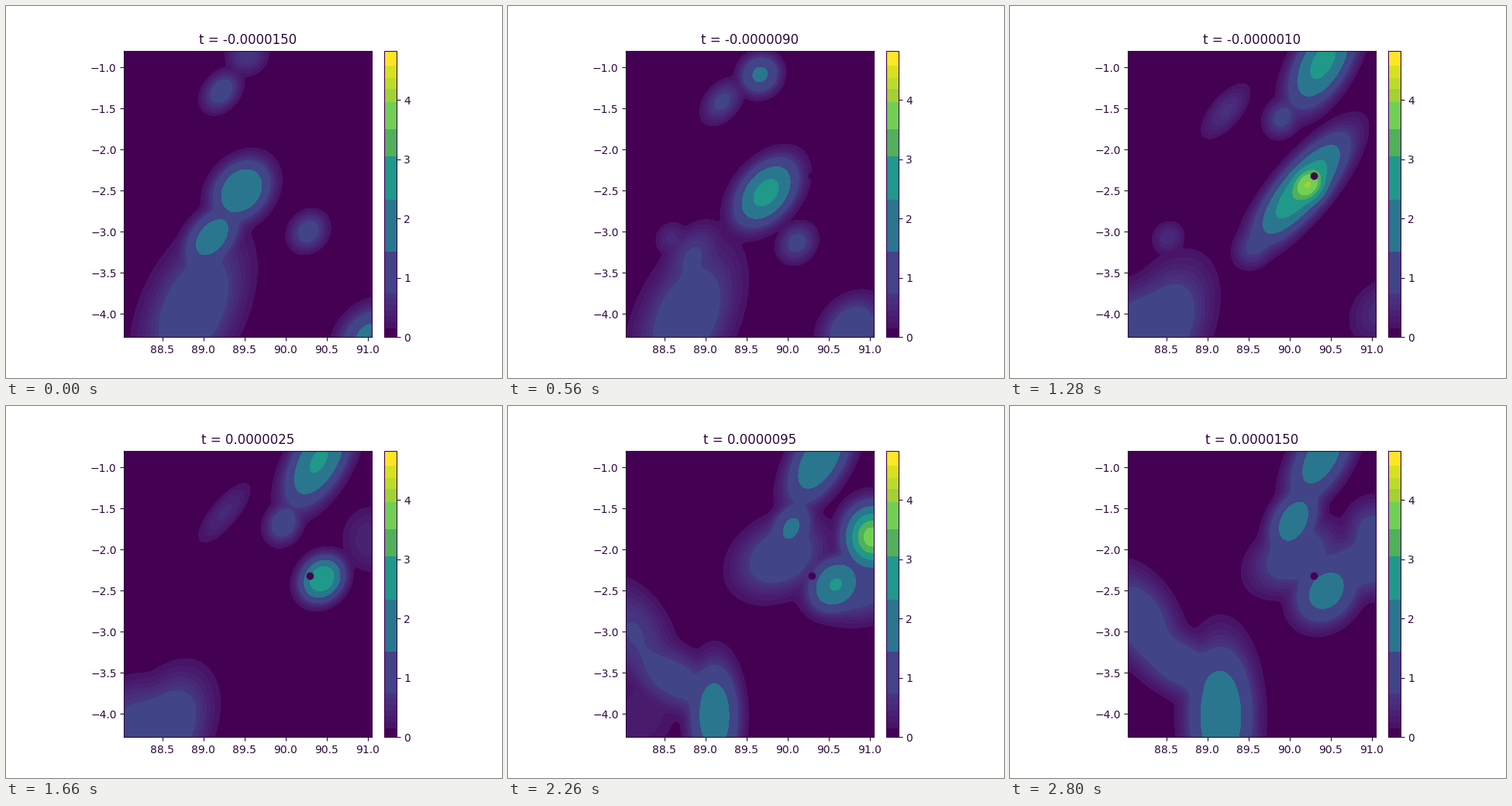
Write a matplotlib script that moves like this. It is 640 by 480 pixels and loops after 2820 ms.

```python
import numpy as np
import matplotlib.pyplot as plt
from matplotlib.animation import FuncAnimation
from matplotlib.cm import ScalarMappable
from matplotlib.colors import BoundaryNorm, ListedColormap

W, H, DPI = 640, 480, 100
INK, DARK = "#2e0a3c", "#440154"
LAST, TICK, RAMP = 60, 20, 6

# plot area in stage pixels (top-left origin); the bar is 5% wide with a 5% gap
LEFT, TOP, WIDTH, HEIGHT = 152.36, 57.6, 319.35, 369.6
BAR_W = 0.05 * WIDTH
BAR_X = LEFT + WIDTH + BAR_W
SCALE = 106
X0, Y1 = 88.0334, -0.798
X1, Y0 = X0 + WIDTH / SCALE, Y1 - HEIGHT / SCALE

LEVELS = [0, .15, .25, .35, .45, .55, .65, .74, 1.44, 2.32, 3.05, 3.5,
          3.96, 4.18, 4.37, 4.57, 4.83]
viridis = plt.get_cmap("viridis")
low = [DARK] + [viridis(v / 4.83) for v in LEVELS[2:8]]
high = ["#414487", "#2a768e", "#20988a", "#50b15a", "#72cf55",
        "#a2d136", "#bbdc2a", "#d6e21f", "#fde725"]
COLORS = low + high

px, py = np.meshgrid(np.linspace(LEFT, LEFT + WIDTH, 161),
                     np.linspace(TOP, TOP + HEIGHT, 186))
gx = X0 + (px - LEFT) / SCALE
gy = Y1 - (py - TOP) / SCALE


def smooth(u):
    u = np.clip(u, 0, 1)
    return u * u * (3 - 2 * u)


def mix(a, b, u):
    return a + (b - a) * u


class Filament:
    """Tilted blob drifting along evenly timed waypoints while it lives."""

    def __init__(self, span, path, size, height, grow=1, tilt=50):
        self.start, self.end = span
        self.path = np.array(path, float)
        self.size = np.array(size, float)
        self.grow = np.broadcast_to(grow, 2)
        self.height = height
        self.tilt = np.radians(tilt)

    def at(self, step):
        away = max(self.start - step, step - self.end, 0)
        u = np.clip((step - self.start) / (self.end - self.start), 0, 1)
        times = np.linspace(0, 1, len(self.path))
        cx, cy = (np.interp(u, times, axis) for axis in self.path.T)
        length, width = self.size * mix(1, self.grow, u * u)
        c, s = np.cos(self.tilt), np.sin(self.tilt)
        dx, dy = px - cx, cy - py
        r = np.hypot((dx * c + dy * s) / length, (dy * c - dx * s) / width)
        peak = mix(*self.height, u) * smooth(1 - away / RAMP)
        return peak * np.exp(-r ** 2.5)


FILAMENTS = [
    # central filament, stretched by the shear, and the front that leaves it
    Filament((0, 29), [(304, 238), (328, 238), (349, 250), (379, 235)],
             (40, 31), (2.3, 3.0), grow=(2.1, .87)),
    Filament((19, 60), [(350, 248), (404, 222), (426, 228), (408, 239)],
             (26, 22), (3.8, 1.8), grow=(1.7, 1.6)),
    # neck and lower left body
    Filament((0, 10), [(266, 298), (238, 320)], (42, 26), (1.9, 1.0)),
    Filament((14, 30), [(211, 300), (203, 299)], (20, 18), (.65, .5)),
    Filament((0, 43), [(242, 390), (228, 405), (198, 412), (225, 415)],
             (95, 52), (1.15, 1.1), grow=(.6, .8), tilt=65),
    Filament((26, 46), [(165, 412), (170, 400)], (52, 46), (1.0, .65)),
    # left wall, bridge and bottom outlet of the last phase
    Filament((44, 60), [(160, 300), (168, 275)], (66, 40), (.6, 1.1), tilt=-60),
    Filament((50, 60), [(215, 352), (218, 332)], (66, 36), (1.0, 1.05), tilt=-32),
    Filament((48, 60), [(266, 400), (272, 400)], (66, 30), (1.95, 2.0),
             grow=1.35, tilt=90),
    # upper left wisp and the blob descending beside it
    Filament((0, 43), [(278, 110), (275, 134), (286, 140)], (27, 19),
             (1.0, .35), grow=(2, .75)),
    Filament((0, 17), [(311, 62), (312, 74), (344, 109)], (25, 23), (.7, 1.95)),
    # stream from the top, its tongue and the patch below
    Filament((26, 60), [(404, 72), (402, 66)], (62, 30), (2.6, 1.9), tilt=60),
    Filament((26, 60), [(349, 142), (366, 160), (366, 148)], (24, 20),
             (.8, 1.9), grow=(1.75, 1.3), tilt=60),
    Filament((40, 60), [(350, 235), (352, 190), (368, 194)], (60, 44),
             (1.15, 1.1), grow=(.95, .85), tilt=30),
    # leg on the right and the lower right corner
    Filament((0, 28), [(390, 291), (370, 308), (314, 312)], (25, 21), (.95, .75)),
    Filament((0, 28), [(470, 430), (434, 420), (470, 412), (478, 395)],
             (42, 33), (1.75, .5)),
    # burst at the right edge and the shelf under it
    Filament((40, 60), [(470, 172), (469, 165)], (40, 34), (5.9, .95), tilt=90),
    Filament((43, 60), [(455, 240), (440, 236), (455, 205)], (58, 38),
             (1.0, 1.0), tilt=0),
]


def field(step):
    total = sum(f.at(step) ** 3 for f in FILAMENTS)
    return np.clip(np.cbrt(total), 0, 4.82)


def stage_axes(x, w):
    return fig.add_axes([x / W, 1 - (TOP + HEIGHT) / H, w / W, HEIGHT / H])


plt.rcParams.update({
    "font.family": "DejaVu Sans", "font.size": 10, "text.color": INK,
    "axes.edgecolor": INK, "xtick.color": INK, "ytick.color": INK,
    "axes.titlecolor": INK,
})
fig = plt.figure(figsize=(W / DPI, H / DPI), dpi=DPI, facecolor="white")
ax = stage_axes(LEFT, WIDTH)
ax.set_facecolor(DARK)
ax.set_xlim(X0, X1)
ax.set_ylim(Y0, Y1)
ax.set_xticks(np.arange(88.5, 91.1, 0.5))
ax.set_yticks(np.arange(-4, -0.9, 0.5))
ax.plot(90.294, -2.321, "o", color=DARK, markersize=6, zorder=3)
title = ax.set_title("", fontsize=12)

cmap = ListedColormap(COLORS)
norm = BoundaryNorm(LEVELS, cmap.N)
bar = fig.colorbar(ScalarMappable(norm, cmap), cax=stage_axes(BAR_X, BAR_W),
                   spacing="proportional", ticks=range(5))
bar.minorticks_off()
bar.outline.set_edgecolor(DARK)

shown = {"step": None, "fill": None}


def update(tick):
    # short, long, short: every third step is held for five ticks
    cycle, part = divmod(tick, 7)
    step = 3 * cycle + (part > 0) + (part > 5)
    if step == shown["step"]:
        return
    if shown["fill"] is not None:
        shown["fill"].remove()
    shown["fill"] = ax.contourf(gx, gy, field(step), levels=LEVELS,
                                colors=COLORS, zorder=1)
    shown["step"] = step
    title.set_text(f"t = {(step - LAST // 2) * 5e-7:.7f}")


anim = FuncAnimation(fig, update, frames=141, interval=TICK,
                     init_func=lambda: None, repeat=True, repeat_delay=0,
                     blit=False)
plt.show()
```
